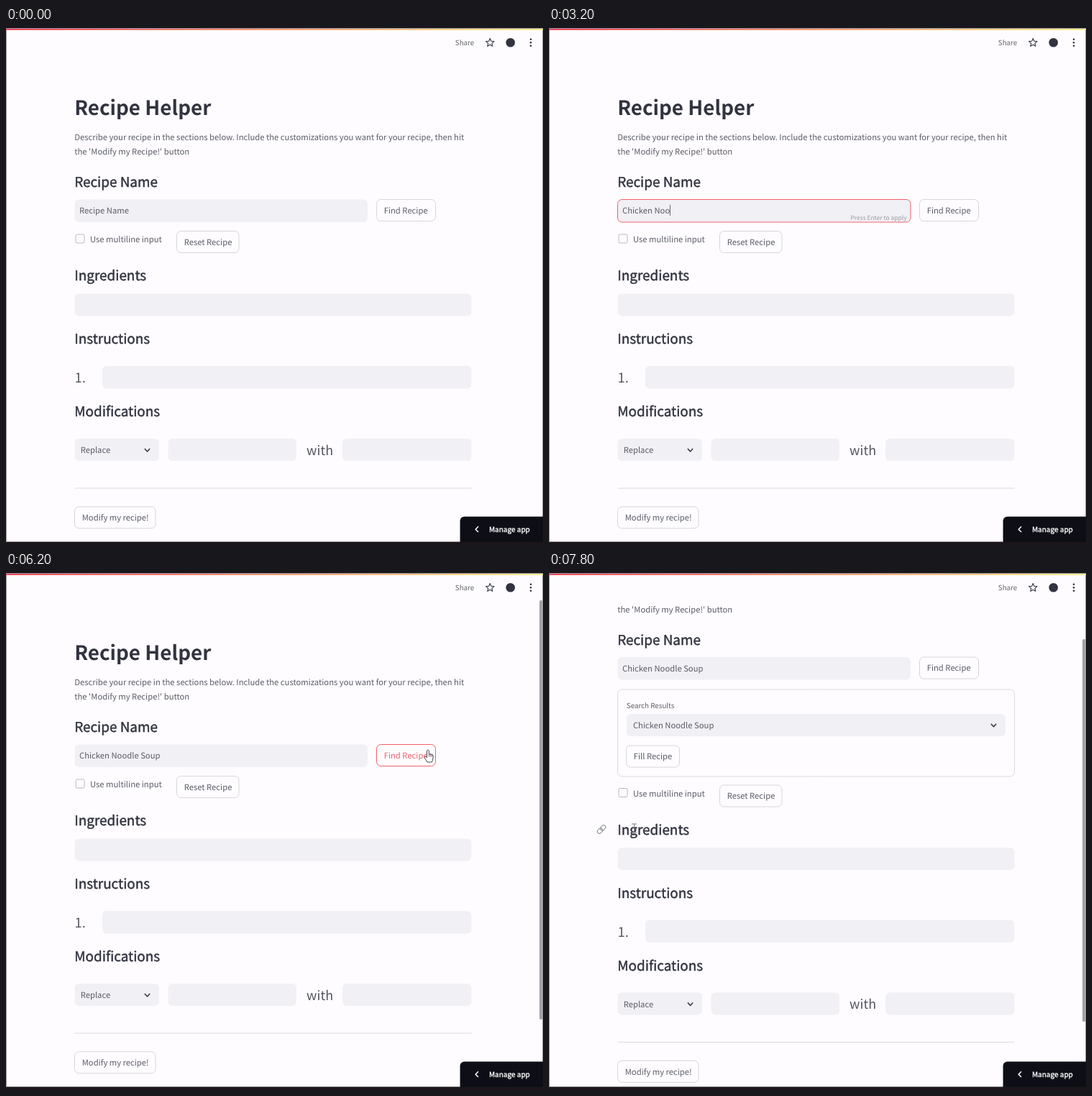
An HTML page with a canvas for the animation above (8000 ms loop, 747 by 719 pixels).

```html
<!DOCTYPE html>
<html lang="en">
<head>
<meta charset="utf-8">
<title>Recipe Helper</title>
<style>
html, body { margin: 0; width: 100%; height: 100%; overflow: hidden; background: #fefcff; }
canvas { display: block; width: 747px; height: 719px; }
</style>
</head>
<body>
<canvas id="stage" width="747" height="719"></canvas>
<script>
const ctx = document.getElementById('stage').getContext('2d');
const W = 747, H = 719, LOOP = 8000, STEP = 200;
const FONT = '"Noto Sans CJK JP", "Noto Sans CJK SC", "Noto Sans CJK KR", "Noto Sans CJK TC", "Open Sans", sans-serif';
const BG = '#fefcff', FIELD = '#f1f0f5', LINE = '#d6d6db', INK = '#31333f', BODY = '#5b5c67', RED = '#f0606a';
const DISH = 'Chicken Noodle Soup';
const BODY_SIZE = 11.25;

const clamp = (v, a = 0, b = 1) => Math.min(b, Math.max(a, v));
const mix = (a, b, k) => a + (b - a) * k;
const ease = k => k * k * (3 - 2 * k);
const span = (t, a, b) => ease(clamp((t - a) / (b - a)));

function text(str, x, y, { size = BODY_SIZE, color = BODY, weight = 400, bold = 0 } = {}) {
  ctx.font = `${weight} ${size}px ${FONT}`;
  ctx.fillStyle = color;
  ctx.fillText(str, x, y);
  if (bold) {
    ctx.strokeStyle = color;
    ctx.lineWidth = bold;
    ctx.strokeText(str, x, y);
  }
}

function textWidth(str, size = BODY_SIZE) {
  ctx.font = `400 ${size}px ${FONT}`;
  return ctx.measureText(str).width;
}

function box(x, y, w, h, fill, stroke, r = 6) {
  ctx.beginPath();
  ctx.roundRect(x, y, w, h, r);
  if (fill) { ctx.fillStyle = fill; ctx.fill(); }
  if (stroke) { ctx.strokeStyle = stroke; ctx.lineWidth = 1; ctx.stroke(); }
}

function rect(x, y, w, h, fill) {
  ctx.fillStyle = fill;
  ctx.fillRect(x, y, w, h);
}

function path(points, color, width, closed) {
  ctx.beginPath();
  points.forEach(([x, y]) => ctx.lineTo(x, y));
  if (closed) ctx.closePath();
  ctx.strokeStyle = color;
  ctx.lineWidth = width;
  ctx.stroke();
}

function dot(x, y, r, color) {
  ctx.beginPath();
  ctx.arc(x, y, r, 0, Math.PI * 2);
  ctx.fillStyle = color;
  ctx.fill();
}

function field(x, y, right, h = 31, border) {
  box(x, y, right - x, h, FIELD, border);
}

function button(label, x, y, right, hot) {
  box(x, y, right - x, 30, BG, hot ? RED : LINE);
  text(label, x + 10.2, y + 19.4, { color: hot ? RED : BODY });
}

const chevronDown = (x, y) => path([[x - 3.6, y - 2], [x, y + 2], [x + 3.6, y - 2]], INK, 1.5);

function caret(x, y) {
  rect(Math.round(x), y - 12, 1, 15, '#6a6b75');
}

function linkIcon(x, y) {
  ctx.save();
  ctx.translate(x, y);
  ctx.rotate(-Math.PI / 4);
  box(-7, -2.8, 8, 5.6, null, '#8d8e96', 2.8);
  box(-1, -2.8, 8, 5.6, null, '#8d8e96', 2.8);
  ctx.restore();
}

function heading(label, y, s) {
  text(label, 95.2, y, { size: 18.9, color: INK, bold: 0.45 });
  const py = s.pointer && s.pointer.y + s.scroll;
  if (s.pointer && s.pointer.x < 648 && py > y - 20 && py < y + 8) linkIcon(73, y - 7);
}

function stateAt(t) {
  const s = {
    typed: t < 2200 ? -1 : clamp(Math.floor(1 + (t - 2200) / 100), 1, DISH.length),
    focus: t >= 1200 && t < 6000,
    selected: t >= 1400 && t < 2200,
    results: t >= 6400,
    selectFocus: t >= 6800 && t < 7600,
    hot: t >= 5400 && t < 6600,
    scroll: 121.5 * span(t, 7400, 7750),
    pointer: null
  };
  s.caret = s.focus && s.typed > 0 && (t < 4050 || Math.floor((t - 4050) / 530) % 2 === 0);
  if (t >= 5000) {
    const k = span(t, 5000, 5500), back = span(t, 6400, 6800), last = span(t, 7400, 7750);
    s.pointer = {
      x: mix(mix(mix(470, 588, k), 266, back), 118.5, last),
      y: mix(mix(mix(450, 254, k), 341, back), 355, last),
      hand: s.hot
    };
  }
  return s;
}

function drawRecipeName(s) {
  heading('Recipe Name', 221, s);
  field(95.5, 238.5, 503, 31.5, s.focus ? RED : null);
  const value = s.typed < 0 ? 'Recipe Name' : DISH.slice(0, s.typed);
  if (s.selected) rect(102, 246, 70, 17, '#3a66cb');
  text(value, 102, 258.3, { color: s.selected ? '#fff' : BODY });
  if (s.caret) caret(102 + textWidth(value), 258);
  if (s.focus && s.typed > 0) text('Press Enter to apply', 419.5, 267, { size: 8.45, color: '#9a9aa3' });
  button('Find Recipe', 515.5, 238.5, 597.5, s.hot);
}

function drawResults(s) {
  box(95.5, 283.5, 552, 121, null, '#dbdbe0');
  text('Search Results', 107.8, 309, { size: 9.8 });
  field(108, 317.5, 635, 31, s.selectFocus ? '#eea3a8' : null);
  text(DISH, 116.9, 337.5);
  if (s.selectFocus) caret(116.9 + textWidth(DISH), 338);
  chevronDown(618.5, 333.3);
  button('Fill Recipe', 107.5, 361.5, 181.5);
}

function drawForm(s) {
  box(97, 287, 12, 12, BG, '#b9b9c0', 2);
  text('Use multiline input', 117, 298);
  button('Reset Recipe', 237.5, 282.5, 324);

  heading('Ingredients', 351, s);
  field(95.5, 369.5, 647.5);

  heading('Instructions', 439, s);
  text('1.', 95.5, 493, { size: 18.4, color: '#555660', weight: 300 });
  field(134, 470, 647.5, 31.5);

  heading('Modifications', 540, s);
  field(95.5, 571, 213);
  text('Replace', 103.7, 591);
  chevronDown(196.5, 587);
  field(225.5, 571, 404);
  text('with', 418, 593.5, { size: 18, color: '#555660', weight: 300 });
  field(468, 571, 647.5);

  rect(95.5, 639.5, 552, 1, '#dcdce0');
  button('Modify my recipe!', 95.5, 665.8, 208);
}

function drawPage(s) {
  ctx.save();
  ctx.beginPath();
  ctx.rect(0, 39, W, 676);
  ctx.clip();
  ctx.translate(0, -s.scroll);
  text('Recipe Helper', 95.2, 121, { size: 27.75, color: INK, weight: 700 });
  text('Describe your recipe in the sections below. Include the customizations you want for your recipe, then hit', 95.3, 156);
  text("the 'Modify my Recipe!' button", 95.3, 176.2);
  drawRecipeName(s);
  if (s.results) {
    drawResults(s);
    ctx.translate(0, 134);
    drawForm({ ...s, scroll: s.scroll - 134 });
  } else {
    drawForm(s);
  }
  ctx.restore();
}

function drawToolbar() {
  text('Share', 624.8, 24, { size: 9.8, color: '#65666f' });
  const star = Array.from({ length: 10 }, (_, i) => {
    const a = -Math.PI / 2 + i * Math.PI / 5, r = i % 2 ? 2.7 : 6;
    return [673.3 + r * Math.cos(a), 20.5 + r * Math.sin(a)];
  });
  path(star, INK, 1.1, true);
  dot(701.7, 20.3, 6.3, INK);
  for (const y of [15.8, 20.3, 24.8]) dot(730, y, 1.3, INK);
}

function drawFrame(t, s) {
  rect(0, 2, 1, 712, '#a2a1a6');
  rect(W - 1, 2, 1, 712, '#a2a1a6');
  const strip = ctx.createLinearGradient(0, 0, W, 0);
  strip.addColorStop(0, '#f04a58');
  strip.addColorStop(1, '#fbf08a');
  rect(0, 1, W, 2, strip);
  rect(0, 0, W, 1, '#8f87a3');

  if (t >= 5000) {
    const k = s.scroll / 121.5;
    const top = mix(38, 92, k);
    const bottom = s.results ? mix(533, 624, k) : 621;
    box(742, top, 4.5, bottom - top, '#a3a2a7', null, 2);
  }

  box(631.6, 679.6, 116, 35.4, '#0d0e16', null, [6, 0, 0, 0]);
  path([[657, 693.3], [653.2, 697.2], [657, 701.1]], '#fff', 1.5);
  text('Manage app', 672, 701, { size: 10, color: '#fff', bold: 0.35 });
  rect(0, 714.5, W, 4.5, '#1b1519');
}

function drawPointer(p) {
  ctx.save();
  ctx.translate(p.x, p.y);
  if (p.hand) {
    ctx.beginPath();
    ctx.moveTo(-2.5, 2);
    ctx.lineTo(-2.5, -7);
    ctx.quadraticCurveTo(-1, -9.5, 0.3, -7);
    ctx.lineTo(0.3, -2.5);
    ctx.lineTo(5, -1.5);
    ctx.quadraticCurveTo(6.5, -1, 6.3, 1);
    ctx.lineTo(5.5, 6);
    ctx.lineTo(4.5, 9);
    ctx.lineTo(-2, 9);
    ctx.lineTo(-6, 2.5);
    ctx.quadraticCurveTo(-5.5, 0, -2.5, 2.5);
    ctx.closePath();
    ctx.fillStyle = '#fff';
    ctx.fill();
    ctx.strokeStyle = '#45464e';
    ctx.lineWidth = 1;
    ctx.stroke();
    for (const x of [0.5, 2.5, 4.5]) path([[x, -2], [x, 1.5]], '#45464e', 0.8);
  } else {
    path([[0, -5.5], [0, 5.5]], '#77787f', 1);
    for (const y of [-6, 6]) path([[-3.5, y], [3.5, y]], '#77787f', 1);
  }
  ctx.restore();
}

function draw(now) {
  const t = Math.floor((now % LOOP) / STEP) * STEP;
  const s = stateAt(t);
  ctx.textRendering = 'geometricPrecision';
  ctx.lineJoin = 'round';
  rect(0, 0, W, H, BG);
  drawPage(s);
  drawToolbar();
  drawFrame(t, s);
  if (s.pointer) drawPointer(s.pointer);
}

function tick() {
  draw(performance.now());
  requestAnimationFrame(tick);
}
tick();
</script>
</body>
</html>
```
